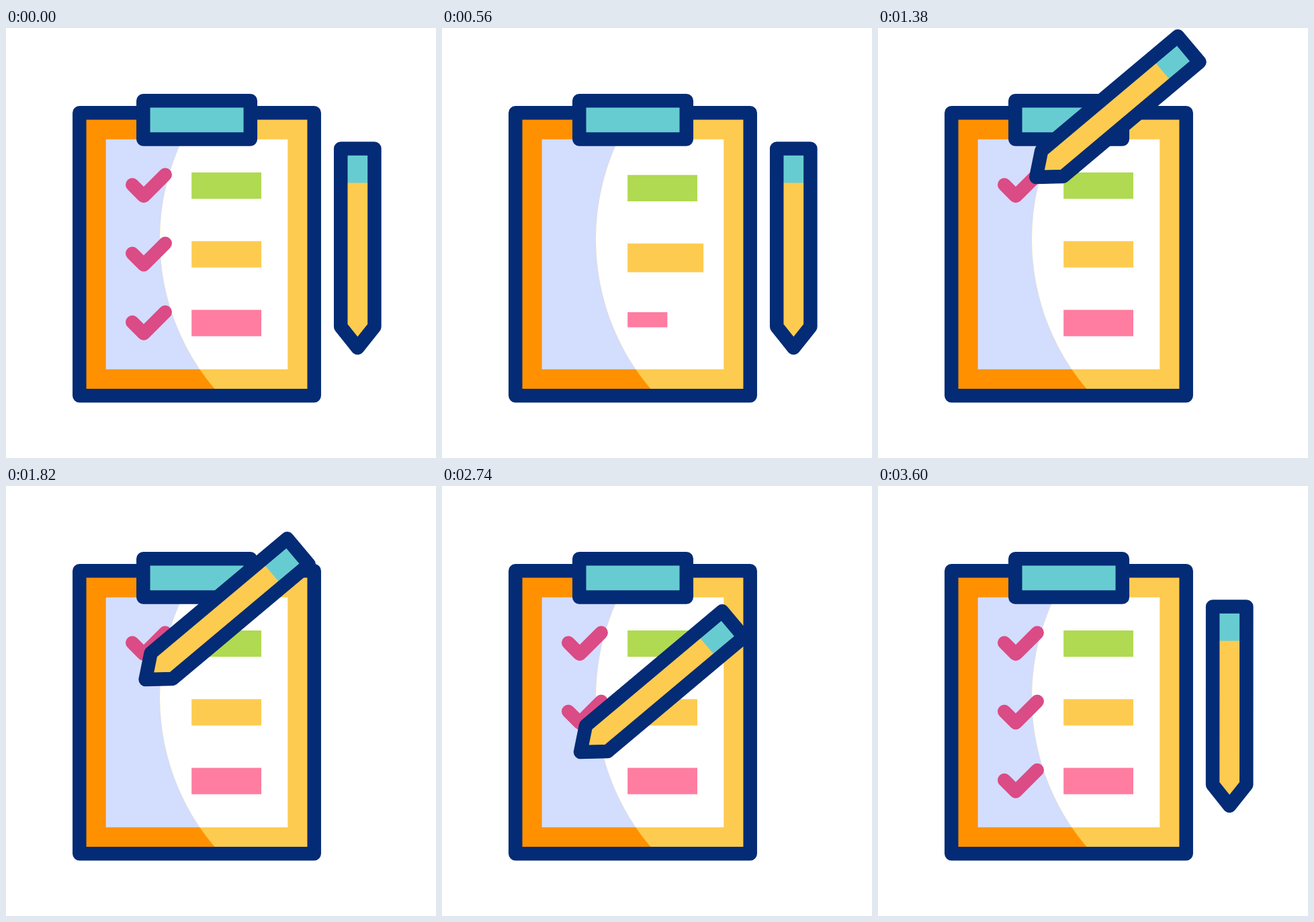
An HTML page that plays this animation: 640x640 px, repeating every 3.62 s.

```html
<!DOCTYPE html>
<html>
<head>
<meta charset="utf-8">
<title>Checklist</title>
<style>
  html, body { margin: 0; height: 100%; overflow: hidden; background: #fff; }
  svg { display: block; width: 100vw; height: 100vh; }
  .line { stroke: #042b75; stroke-width: 20.5; stroke-linejoin: round; }
  .check { fill: none; stroke: #db4b85; stroke-width: 20; stroke-linecap: round; stroke-linejoin: round; }
</style>
</head>
<body>
<svg viewBox="0 0 640 640">
  <defs>
    <clipPath id="lit"><circle cx="574" cy="314.5" r="345"/></clipPath>
    <clipPath id="sheet"><path d="M148.7 165.7H419.3V508H148.7z"/></clipPath>
  </defs>
  <path fill="#ff9100" d="M109 126H459V547H109z"/>
  <path fill="#d3ddfd" d="M148.7 165.7H419.3V508H148.7z"/>
  <g clip-path="url(#lit)">
    <path fill="#fdcb50" d="M109 126H459V547H109z"/>
    <path fill="#fff" d="M148.7 165.7H419.3V508H148.7z"/>
  </g>
  <g clip-path="url(#sheet)"><g id="old"></g><g id="fresh"></g></g>
  <path class="line" fill="none" d="M109.3 126.3H458.7V547.2H109.3z"/>
  <path class="line" fill="#67ccd1" d="M204.3 108.3H363.8V165.6H204.3z"/>
  <g id="pencil">
    <path fill="#fdcb50" d="M-25.1 -31.5V-296.4H25.1V-31.5L0 0z"/>
    <path fill="#67ccd1" d="M-25.1 -296.4H25.1V-245.6H-25.1z"/>
    <path class="line" fill="none" d="M-25.1 -31.5V-296.4H25.1V-31.5L0 0z"/>
  </g>
</svg>
<script>
const LOOP = 3620, SCROLL = 342, ROW = 102.2;
const LEG1 = 24.04, LEG2 = 45.25;
const byId = id => document.getElementById(id);
const old = byId('old'), fresh = byId('fresh'), pencil = byId('pencil');

const rows = ['#b0da51', '#fdcb50', '#fe7da0'].map((color, i) =>
  `<g transform="translate(0 ${i * ROW})">
    <path class="check" d="M188 233.3L205 250.3L237 218.3"/>
    <g transform="translate(276.2 215)"><path class="bar" fill="${color}" d="M0 0H103.8V39.3H0z"/></g>
  </g>`).join('');
old.innerHTML = fresh.innerHTML = rows;
const checks = fresh.querySelectorAll('.check');
const bars = fresh.querySelectorAll('.bar');

const part = (t, a, b) => Math.min(1, Math.max(0, (t - a) / (b - a)));
const smooth = p => p * p * (3 - 2 * p);
const cubic = p => p < .5 ? 4 * p ** 3 : 1 - 4 * (1 - p) ** 3;
const linear = p => p;
const slow = p => 1 - (1 - p) ** 1.5;

// Start, corner and end times of each check stroke
const strokes = [[1060, 1120, 1380], [2040, 2108, 2320], [2930, 3000, 3205]];

// Pencil tip moves: start, end, easing, end point, end angle, curve control
const rest = [523.3, 476];
const moves = [
  [550, 1040, cubic, [184.5, 231], 50, [287, 440]],
  [1060, 1120, linear, [205, 250.5], 50],
  [1120, 1380, slow, [235.3, 222], 50],
  [1550, 2040, smooth, [187.5, 336], 50],
  [2040, 2108, linear, [205.7, 353.5], 50],
  [2108, 2320, slow, [238, 324], 50],
  [2470, 2930, smooth, [187.5, 438], 50],
  [2930, 3000, linear, [205.7, 455], 50],
  [3000, 3205, slow, [238, 426], 50],
  [3205, 3605, smooth, rest, 0, [318, 486]]
];

function pencilPose(t) {
  let point = rest, angle = 0;
  for (const [a, b, ease, end, endAngle, control] of moves) {
    if (t < a) break;
    const u = ease(part(t, a, b));
    point = point.map((from, k) => {
      const mid = control ? control[k] : (from + end[k]) / 2;
      return (1 - u) ** 2 * from + 2 * u * (1 - u) * mid + u * u * end[k];
    });
    angle += (endAngle - angle) * u;
  }
  return `translate(${point}) rotate(${angle})`;
}

function draw(t) {
  const shift = SCROLL * smooth(part(t, 5, 597));
  old.setAttribute('transform', `translate(0 ${-shift})`);
  fresh.setAttribute('transform', `translate(0 ${SCROLL - shift})`);

  bars.forEach((bar, i) => {
    const age = t - 110 - 164 * i;
    const size = 1.1 * smooth(part(age, 0, 240)) - .1 * smooth(part(age, 240, 460));
    bar.setAttribute('transform', `scale(${size})`);
  });

  checks.forEach((check, i) => {
    const [start, corner, end] = strokes[i];
    const length = LEG1 * part(t, start, corner) + LEG2 * slow(part(t, corner, end));
    check.style.visibility = length > 0 ? 'visible' : 'hidden';
    check.style.strokeDasharray = `${length} 200`;
  });

  pencil.setAttribute('transform', pencilPose(t));
}

const begin = performance.now();
function tick() {
  draw((performance.now() - begin) % LOOP);
  requestAnimationFrame(tick);
}
tick();
</script>
</body>
</html>
```
